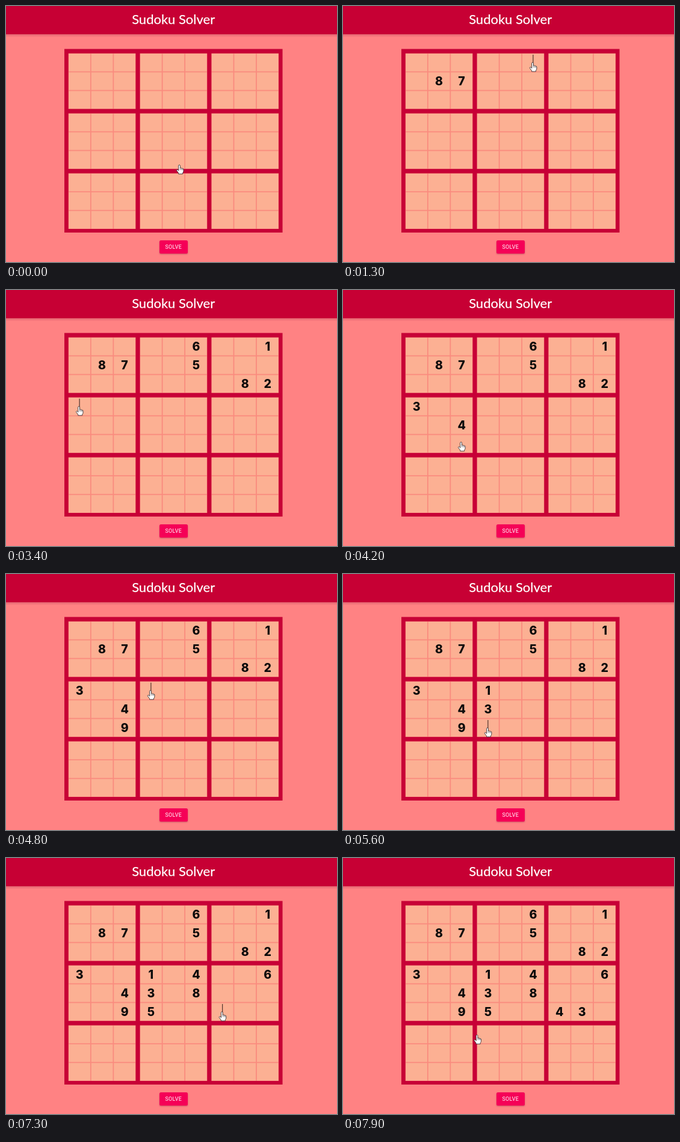
Write an HTML page that moves like this. It is 550 px wide and 426 px high and loops after 8 s.

```html
<!DOCTYPE html>
<html lang="en">
<head>
<meta charset="utf-8">
<title>Sudoku Solver</title>
<style>
  html, body { margin: 0; width: 100%; height: 100%; overflow: hidden; background: #ff8283; }
  svg { display: block; width: 550px; height: 426px; }
  text { text-anchor: middle; }
  .title { font: 400 22px Lato, "Open Sans", sans-serif; fill: #fff; stroke: #fff; stroke-width: .25; }
  .digit { font: 800 19.5px Inter, "Liberation Sans", sans-serif; fill: #0b0b0b; }
  .label { font: 400 9px Roboto, sans-serif; letter-spacing: .25px; fill: #fff; }
</style>
</head>
<body>
<svg viewBox="0 0 550 426" xmlns="http://www.w3.org/2000/svg">
  <defs>
    <linearGradient id="fade" x2="0" y2="1">
      <stop offset="0" stop-color="#b03050" stop-opacity=".35"/>
      <stop offset="1" stop-color="#b03050" stop-opacity="0"/>
    </linearGradient>
    <filter id="soft" x="-20%" y="-30%" width="140%" height="180%">
      <feGaussianBlur stdDeviation="1.2"/>
    </filter>
  </defs>
  <rect width="550" height="426" fill="#ff8283"/>
  <rect y="47" width="550" height="5" fill="url(#fade)"/>
  <rect width="550" height="47" fill="#c70034"/>
  <text class="title" x="278.2" y="30">Sudoku Solver</text>
  <rect x="97" y="71.5" width="362.5" height="305.5" fill="#c70036"/>
  <g id="board"></g>
  <g id="digits"></g>
  <rect x="255" y="391" width="47" height="22" rx="2.5" fill="#7a1030" opacity=".4" filter="url(#soft)"/>
  <rect x="255" y="390" width="47" height="22" rx="2.5" fill="#f50057"/>
  <text class="label" x="278.3" y="404.2">SOLVE</text>
  <path id="caret" d="M0-13V8" stroke="#2a1a18"/>
  <g id="hand" stroke="#3a3034" stroke-linejoin="round" stroke-linecap="round">
    <path d="M-1.4 1.2Q-1.4 0 0 0T1.4 1.2V5.2Q2.7 4.3 3.5 5.6Q4.8 5 5.4 6.2Q7 5.8 7 7.4V10Q7 12 5.6 13.2V15H-1.4V13.4L-4.3 9.6Q-5 8.4-4 7.8Q-3 7.3-1.4 9.2Z"
      fill="#fff" stroke-width=".9"/>
    <path d="M1.4 5.4V8M3.5 5.9V8.2M5.4 6.5V8.4" fill="none" stroke-width=".6"/>
  </g>
</svg>
<script>
  const LOOP = 8000, FIRST = 510, STEP = 430, HOLD = 120;
  const CELL_W = 37.5, CELL_H = 31.1, BOX_W = 118.8, BOX_H = 99.8;
  const $ = id => document.getElementById(id);

  function add(parent, tag, attrs) {
    const el = document.createElementNS("http://www.w3.org/2000/svg", tag);
    for (const name in attrs) el.setAttribute(name, attrs[name]);
    return parent.appendChild(el);
  }

  function center(row, col) {
    const place = (i, start, box, cell) => start + Math.floor(i / 3) * box + (i % 3) * cell;
    return { x: place(col, 122.1, BOX_W, CELL_W), y: place(row, 94, BOX_H, CELL_H) };
  }

  // a rectangle spanning n by n cells, drawn in by a margin
  function square(row, col, n, margin, fill) {
    const { x, y } = center(row, col);
    add($("board"), "rect", {
      x: x - CELL_W / 2 + margin, y: y - CELL_H / 2 + margin,
      width: n * CELL_W - 2 * margin, height: n * CELL_H - 2 * margin, fill
    });
  }

  for (let i = 0; i < 9; i++) square(Math.floor(i / 3) * 3, (i % 3) * 3, 3, .4, "#fa8b7e");
  for (let i = 0; i < 81; i++) square(Math.floor(i / 9), i % 9, 1, .9, "#fcb093");

  // row, column and digit of each entry, typed at a steady pace
  const entries = "118 127 056 155 081 278 282 303 424 529 331 433 535 354 458 386 564 573"
    .split(" ").map(([row, col, digit], i) => {
      const spot = center(+row, +col);
      const node = add($("digits"), "text", { class: "digit", x: spot.x, y: spot.y + 7.2 });
      node.textContent = digit;
      return { ...spot, node, time: FIRST + i * STEP };
    });

  // the pointer rests in each cell and wanders between some of them
  const path = [
    { time: 0, x: 288, y: 264.5 },
    { time: 2500, x: 391, y: 167 },
    { time: 6700, x: 346, y: 240 },
    { time: 7900, x: 222.5, y: 294.5 },
    { time: LOOP, x: 222.5, y: 297 },
    ...entries.flatMap(({ time, x, y }) =>
      [time - HOLD, time].map(t => ({ time: t, x: x - 1, y })))
  ].sort((a, b) => a.time - b.time);

  const show = (el, on) => { el.style.display = on ? "" : "none"; };
  const move = (el, x, y) => el.setAttribute("transform", `translate(${x} ${y})`);
  const ease = k => k * k * (3 - 2 * k);

  function draw(t) {
    for (const e of entries) show(e.node, t >= e.time);

    const active = entries.find(e => t >= e.time - HOLD && t < e.time);
    show($("caret"), active);
    if (active) move($("caret"), active.x, active.y);

    const next = path.findIndex(p => p.time > t);
    const a = path[next - 1], b = path[next];
    const k = ease((t - a.time) / (b.time - a.time));
    move($("hand"), a.x + (b.x - a.x) * k, a.y + (b.y - a.y) * k);
  }

  const start = performance.now();
  function tick() {
    draw(Math.max(0, performance.now() - start) % LOOP);
    requestAnimationFrame(tick);
  }
  tick();
</script>
</body>
</html>
```
